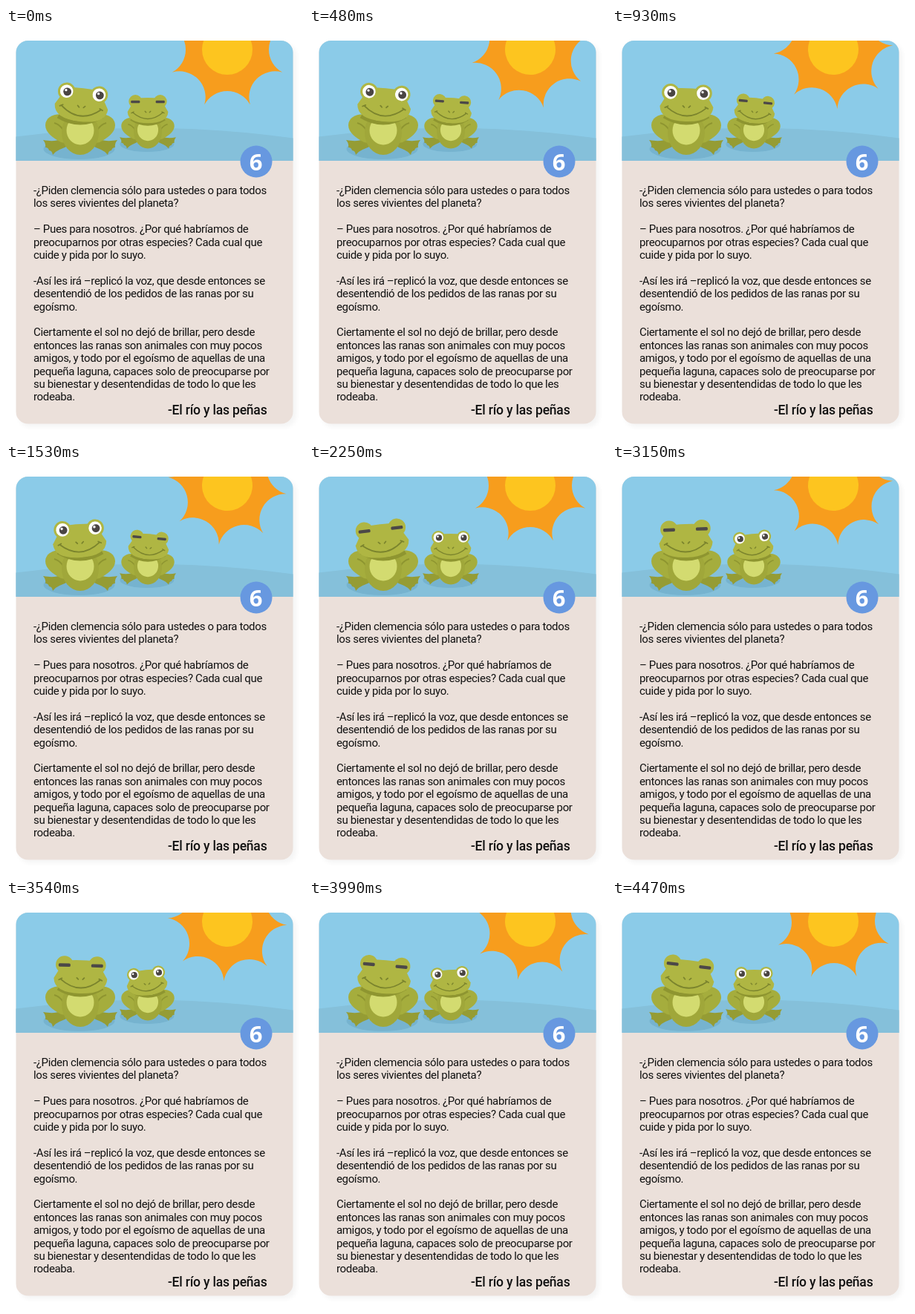
Animation of 400 by 550 pixels, one loop 4.5 s. Source, as an HTML page:

```html
<!DOCTYPE html>
<html lang="es">
<head>
<meta charset="utf-8">
<title>Fábula</title>
<style>
  html, body { margin: 0; width: 100%; height: 100%; overflow: hidden; background: #fff; }
  svg { display: block; }
  .story { font: 15px Roboto, sans-serif; letter-spacing: -.355px; fill: #111; }
  .name { font: 500 17.5px Roboto, sans-serif; letter-spacing: -.2px; fill: #111; }
  .badge { font: 700 31px "Open Sans", sans-serif; fill: #fff; text-anchor: middle; }
</style>
</head>
<body>
<svg width="400" height="550" viewBox="0 0 400 550">
  <defs>
    <clipPath id="card"><rect x="13.500" y="17" width="373" height="516.500" rx="16"/></clipPath>
    <filter id="soft"><feGaussianBlur stdDeviation="3"/></filter>
  </defs>
  <rect x="17" y="21" width="374" height="517" rx="16" fill="#000" opacity=".04" filter="url(#soft)"/>
  <g clip-path="url(#card)">
    <rect x="13" y="17" width="374" height="517" fill="#ebe0da"/>
    <rect x="13" y="17" width="374" height="162" fill="#8bcbe8"/>
    <path d="M13 146.500Q197 122 387 148.500V179H13Z" fill="#85c0da"/>
    <g id="sun"></g>
    <g id="frogs"></g>
  </g>
  <circle cx="337" cy="180" r="21.500" fill="#6798e0"/>
  <text class="badge" x="336.500" y="191.500">6</text>
  <g id="story" class="story"></g>
  <text class="name" x="218" y="521">-El río y las peñas</text>
</svg>
<script>
const $ = id => document.getElementById(id);
const LOOP = 4500, SUN = [298, 29];

const story = `-¿Piden clemencia sólo para ustedes o para todos
los seres vivientes del planeta?

– Pues para nosotros. ¿Por qué habríamos de
preocuparnos por otras especies? Cada cual que
cuide y pida por lo suyo.

-Así les irá –replicó la voz, que desde entonces se
desentendió de los pedidos de las ranas por su
egoísmo.

Ciertamente el sol no dejó de brillar, pero desde
entonces las ranas son animales con muy pocos
amigos, y todo por el egoísmo de aquellas de una
pequeña laguna, capaces solo de preocuparse por
su bienestar y desentendidas de todo lo que les
rodeaba.`;
$('story').innerHTML = story.split('\n')
  .map((line, i) => `<text x="37" y="${224 + 17.4 * i}">${line}</text>`).join('');

// Eight tips joined by arcs that curve towards the centre
const tip = i => {
  const a = (i + .5) * Math.PI / 4;
  return `${80.5 * Math.cos(a)} ${80.5 * Math.sin(a)}`;
};
let rays = 'M' + tip(0);
for (let i = 1; i <= 8; i++) rays += `A35 35 0 0 0 ${tip(i)}`;
$('sun').innerHTML = `<path d="${rays}Z" fill="#f79d1d"/><circle r="34" fill="#fdc51f"/>`;

const eye = x => `
  <circle cx="${x}" cy="87.500" r="8.800" fill="#fff"/>
  <circle cx="${x + 1}" cy="88" r="5.400" fill="#4a4543"/>
  <circle cx="${x - 1}" cy="86" r="1.700" fill="#fff"/>`;
const lid = x => `<rect x="${x - 8}" y="86" width="16" height="4.400" rx="1.600" fill="#4c4848"/>`;

// One leg with its webbed foot, mirrored for the other side
const leg = `
  <path d="M84 144C76 151 66 154 50 151Q54 156 53 161Q57 161 58 165Q62 165 63 171Q67 166 72 164
    Q80 161 88 156Z" fill="#959c34"/>
  <path d="M79 117C66 114 53 120 53 131C53 141 63 148 74 154L84 156L88 130Z" fill="#a5ad3d"/>
  <path d="M65 128Q80 132 83 158" fill="none" stroke="#8e9530" stroke-width="2"/>`;

const frog = (id, transform) => `
  <g transform="${transform}">
    <ellipse cx="98.500" cy="163" rx="48" ry="14" fill="#76b3cf"/>
    ${leg}<g transform="matrix(-1 0 0 1 200 0)">${leg}</g>
    <ellipse cx="100" cy="141" rx="25" ry="30" fill="#a0a73a"/>
    <ellipse cx="100" cy="138" rx="18.500" ry="19.500" fill="#d3db70"/>
    <path d="M70 119Q100 137 130 119" fill="none" stroke="#8e9530" stroke-width="5"/>
    <g id="${id}">
      <g fill="#afb643">
        <circle cx="78" cy="87.500" r="11.800"/><circle cx="122" cy="87.500" r="11.800"/>
        <path d="M78 82Q100 80 122 82L136 106Q135 126 100 126Q65 126 64 106Z"/>
      </g>
      <g fill="none" stroke="#7b842d" stroke-width="1.800" stroke-linecap="round">
        <path d="M73 107Q100 130 127 107M71 108L75 106M125 106L129 108"/>
        <path d="M95 105L97 107M105 105L103 107"/>
      </g>
      <g class="open">${eye(78)}${eye(122)}</g>
      <g class="shut">${lid(78)}${lid(122)}</g>
    </g>
  </g>`;
$('frogs').innerHTML = frog('big', '') + frog('small', 'translate(115 32.5) scale(.76)');

function pose(id, angle, awake) {
  const head = $(id);
  head.setAttribute('transform', `rotate(${angle} 100 119)`);
  head.querySelector('.open').style.display = awake ? '' : 'none';
  head.querySelector('.shut').style.display = awake ? 'none' : '';
}

function draw(now) {
  const t = Math.floor(now % LOOP / 30) * 30;
  const phase = t / LOOP * 2 * Math.PI, firstHalf = t < LOOP / 2;
  $('sun').setAttribute('transform', `translate(${SUN}) rotate(${t / LOOP * 90})`);
  pose('big', 6.5 * Math.cos(phase), firstHalf);
  pose('small', 6 * Math.sin(phase), !firstHalf);
  requestAnimationFrame(draw);
}
draw(0);
</script>
</body>
</html>
```
